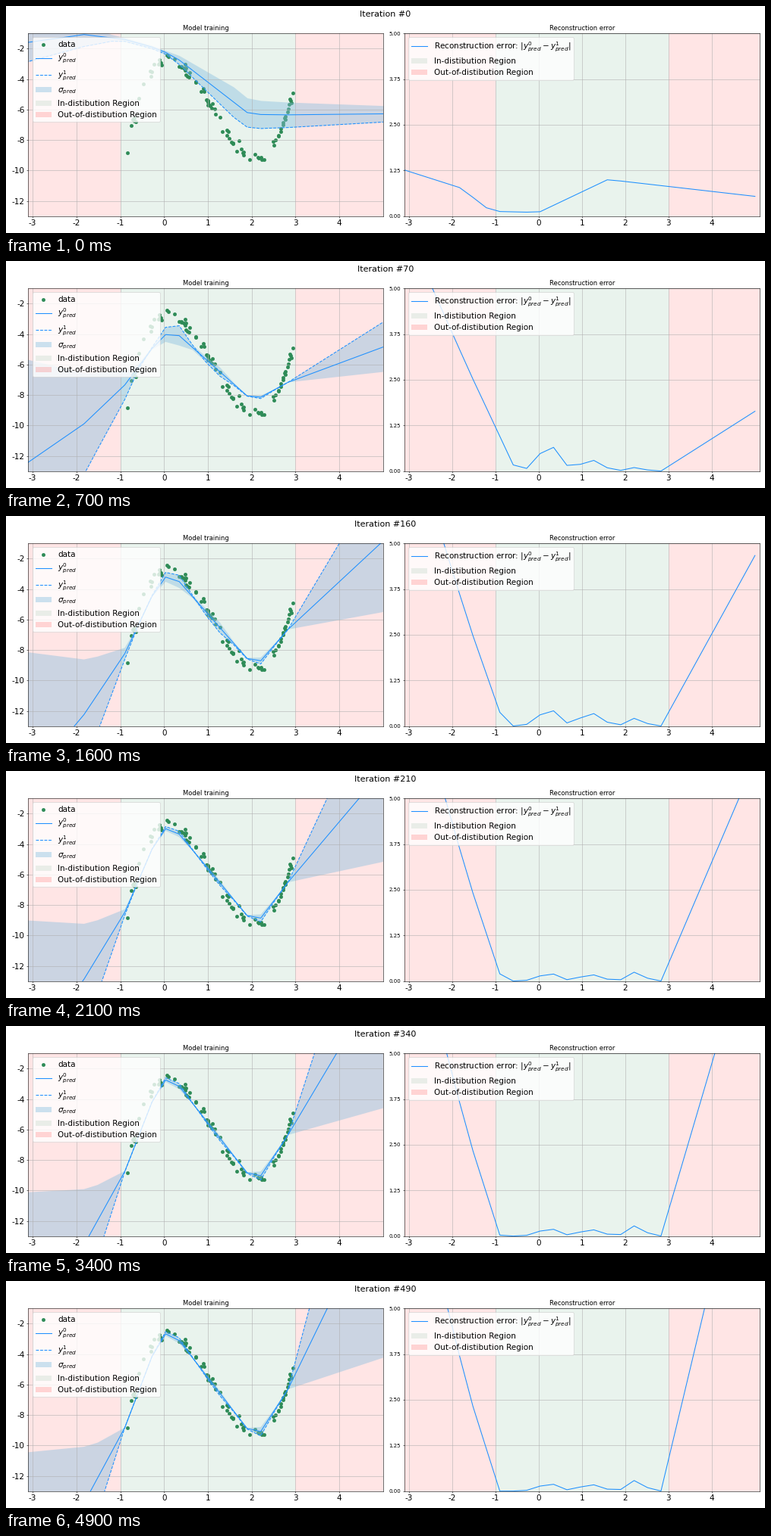
Write a matplotlib script that moves like this. It is 1000 px wide and 300 px high and loops after 5000 ms.

```python
import numpy as np
import matplotlib.pyplot as plt
from matplotlib.animation import FuncAnimation

plt.rcParams.update({"font.family": "DejaVu Sans", "axes.unicode_minus": False})

FRAMES, INTERVAL, STEP = 50, 100, 10
WARMUP = 30  # iterations until the wave begins to show
X = np.linspace(-4, 5, 30)
BLUE, GREEN, SKY = "dodgerblue", "seagreen", "#85bedf"

# The model is a polyline; its bends untrained, after warm-up and when settled
BENDS = X[[7, 10, 12, 13, 14, 19, 20, 22]]
UNTRAINED = np.array([-1.08, -1.4, -1.9, -2.25, -2.75, -6.2, -6.33, -6.35])
WARM = np.array([-7.95, -6.6, -5.35, -4.72, -4.6, -7.65, -7.67, -7.6])
SETTLED = np.array([-13.85, -8.85, -4.15, -2.65, -3.1, -8.9, -9.1, -6.3])


def rise(s, tau):
    return 1 - np.exp(-s / tau)


def hinge(x):
    return np.maximum(x, 0)


def bump(center, width):
    return np.exp(-((X - center) / width) ** 2)


def polyline(heights, left, right):
    """Through the bends, with straight tails of the given slopes."""
    return (np.interp(X, BENDS, heights)
            - left * hinge(BENDS[0] - X) + right * hinge(X - BENDS[-1]))


def trained(s):
    """First prediction and signed gap to the second, s iterations after warm-up."""
    mean = polyline(WARM + (SETTLED - WARM) * rise(s, 100),
                    left=1 + 4.2 * rise(s, 150), right=0.2 + 7.6 * rise(s, 330))
    swing = 0.2 + 0.5 / (1 + np.exp((s - 130) / 12))
    inside = (swing * (bump(0.25, 0.35) - 0.9 * rise(s, 60) * bump(1.2, 0.35))
              - 0.3 * rise(s, 100) * bump(2.25, 0.25))
    left = ((1.65 + 2.1 * rise(s, 75)) * hinge(-0.25 - 0.65 * rise(s, 75) - X)
            + 1.3 * rise(s, 330) * hinge(-1.6 - X))
    right = 6.6 * rise(s, 330) * hinge(X - BENDS[-1])
    return np.array([mean, inside - left + right])


def untrained():
    gap = np.interp(X, [-4, -1.8, -1.1, 0, 1.6, 5], [-1.6, -0.77, -0.13, -0.1, -1, -0.54])
    return np.array([polyline(UNTRAINED, left=0.4, right=0.03), gap])


def predict(it):
    mix = min(it / WARMUP, 1)
    return (1 - mix) * untrained() + mix * trained(max(it - WARMUP, 0))


def sample_data(n=90):
    rng = np.random.default_rng(4)
    x = rng.uniform(-1, 3, n)
    u = x - 0.1
    return x, -2.8 + 4.8 * (u**3 / 3 - u**2) + rng.normal(0, 0.22, n)


def add_regions(ax, right):
    opts = dict(alpha=0.1, lw=0, zorder=0.5)
    ax.axvspan(-1, 3, color=GREEN, label="In-distibution Region", **opts)
    ax.axvspan(-3.1, -1, color="red", label="Out-of-distibution Region", **opts)
    ax.axvspan(3, right, color="red", **opts)


def finish(ax, title, right, ylim, yticks):
    add_regions(ax, right)
    ax.set(title=title, xlim=(-3.1, right), ylim=ylim, xticks=range(-3, 5), yticks=yticks)
    ax.tick_params(axis="x", labelsize=15)
    ax.grid(True)
    legend = ax.legend(loc="upper left", fontsize=15)
    legend.legend_handles[-1].set_alpha(0.15)


fig, (ax_fit, ax_err) = plt.subplots(1, 2, figsize=(20, 6), dpi=50)
heading = fig.suptitle("Iteration #0", fontsize=16)

ax_fit.scatter(*sample_data(), color=GREEN, label="data")
line0, = ax_fit.plot(X, X, color=BLUE, label="$y_{pred}^0$")
line1, = ax_fit.plot(X, X, "--", color=BLUE, label="$y_{pred}^1$")
band = ax_fit.fill_between(X, X, X + 1, color=SKY, alpha=0.42, lw=0,
                           label=r"$\sigma_{pred}$")
finish(ax_fit, "Model training", 5, (-13, -1), range(-12, 0, 2))
ax_fit.tick_params(axis="y", labelsize=15)

error, = ax_err.plot(X, X, color=BLUE,
                     label="Reconstruction error: $|y_{pred}^0 - y_{pred}^1|$")
finish(ax_err, "Reconstruction error", 5.1, (0, 5), np.linspace(0, 5, 5))
fig.tight_layout()


def update(frame):
    it = frame * STEP
    y0, gap = predict(it)
    spread = np.abs(gap)
    heading.set_text(f"Iteration #{it}")
    line0.set_ydata(y0)
    line1.set_ydata(y0 + gap)
    band.set_verts([np.r_[np.c_[X, y0 + spread], np.c_[X, y0 - spread][::-1]]])
    error.set_ydata(spread)
    return heading, line0, line1, band, error


anim = FuncAnimation(fig, update, frames=FRAMES, interval=INTERVAL,
                     repeat=True, repeat_delay=0)
plt.show()
```
